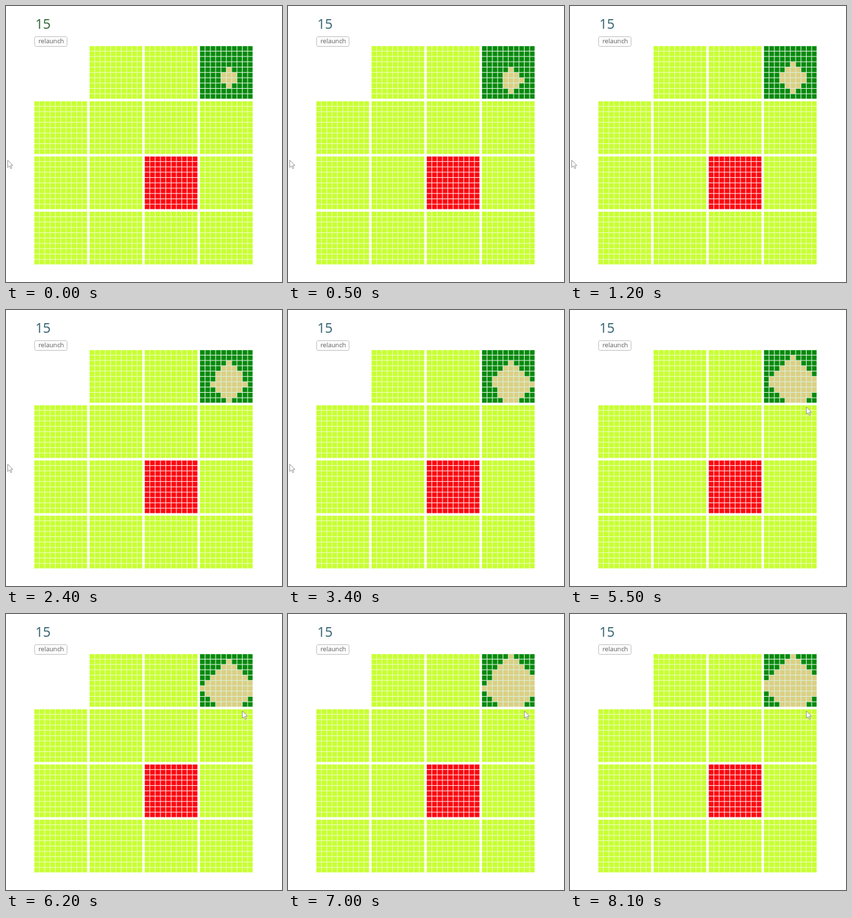
An HTML page that plays this animation: 400x400 px, repeating every 8200 ms.

```html
<!DOCTYPE html>
<html lang="en">
<head>
<meta charset="utf-8">
<title>Grid growth</title>
<style>
  html, body { margin: 0; width: 100%; height: 100%; overflow: hidden; background: #fff; }
  svg { display: block; width: 400px; height: 400px; }
  text { font-family: "Open Sans", "Noto Sans", sans-serif; }
</style>
</head>
<body>
<svg viewBox="0 0 400 400" xmlns="http://www.w3.org/2000/svg">
  <text id="count" x="42.4" y="32.7" font-size="19.6">15</text>
  <rect x="41.5" y="44.5" width="47" height="14" rx="2" fill="#fdfdfd" stroke="#c6c6c6"/>
  <text x="47" y="54.3" font-size="9.1" fill="#5a5a5a">relaunch</text>
  <g id="tiles"></g>
  <path id="cursor" d="M.5 .5V11L3 8.8 4.8 12.7 6.4 12 4.7 8.2H8Z"
        fill="#fff" stroke="#8a8a8a" stroke-width=".8" stroke-linejoin="round"/>
</svg>
<script>
const LOOP = 8200, SIZE = 10, PITCH = 7.72, CELL = 6.7;
const GRASS = '#c8ff32', GREEN = '#068a0c', SAND = '#dccf82', RED = '#fb0810';
const tiles = document.getElementById('tiles');
const count = document.getElementById('count');
const cursor = document.getElementById('cursor');

// [ms, cells reached by the flood]
const pace = [[0, 8], [1200, 18], [2400, 30], [4400, 48], [5500, 55], [7000, 69], [8100, 73]];

// breadth-first order: up, right, down, left of each cell in turn
function floodOrder(col, row, total) {
  const queue = [[col, row]];
  const order = new Map([[col + ',' + row, 0]]);
  for (let i = 0; order.size < total; i++) {
    const [c, r] = queue[i];
    for (const [dc, dr] of [[0, -1], [1, 0], [0, 1], [-1, 0]]) {
      const key = (c + dc) + ',' + (r + dr);
      if (order.has(key)) continue;
      order.set(key, order.size);
      queue.push([c + dc, r + dr]);
    }
  }
  return order;
}

const order = floodOrder(5, 6, 100);
const growing = [];

function addRect(x, y, size, fill, opacity = 1) {
  const rect = document.createElementNS('http://www.w3.org/2000/svg', 'rect');
  const box = { x, y, width: size, height: size, fill, opacity };
  for (const key in box) rect.setAttribute(key, box[key]);
  tiles.append(rect);
  return rect;
}

function addTile(col, row) {
  const home = col === 3 && row === 0;
  const fill = home ? GREEN : col === 2 && row === 2 ? RED : GRASS;
  const x = 41.2 + col * 80, y = 58.2 + row * 80;
  // soft tint showing in the gaps
  addRect(x, y, PITCH * (SIZE - 1) + CELL, fill, fill === GRASS ? 0.35 : 0.15);
  for (let r = 0; r < SIZE; r++) {
    for (let c = 0; c < SIZE; c++) {
      const cell = addRect(x + c * PITCH, y + r * PITCH, CELL, fill);
      const rank = order.get(c + ',' + r);
      if (home && rank !== undefined) growing.push({ cell, rank });
    }
  }
}

for (let row = 0; row < 4; row++)
  for (let col = 0; col < 4; col++)
    if (row || col) addTile(col, row);

function reached(t) {
  const i = pace.findIndex(([ms]) => ms > t);
  if (i < 0) return pace[pace.length - 1][1];
  const [t0, n0] = pace[i - 1], [t1, n1] = pace[i];
  return Math.floor(n0 + (n1 - n0) * (t - t0) / (t1 - t0));
}

function draw(now) {
  const t = Math.floor((now % LOOP) / 100) * 100;
  const n = reached(t);
  for (const { cell, rank } of growing) cell.setAttribute('fill', rank < n ? SAND : GREEN);
  count.setAttribute('fill', t < 500 ? '#2a6433' : '#2f606d');
  const p = Math.min(1, Math.max(0, (t - 4600) / 700));
  const k = p * p * (3 - 2 * p);
  cursor.setAttribute('transform', `translate(${2 + 340 * k} ${223 - 83 * k})`);
}

const begin = performance.now();
function tick() {
  draw(performance.now() - begin);
  requestAnimationFrame(tick);
}
tick();
</script>
</body>
</html>
```
